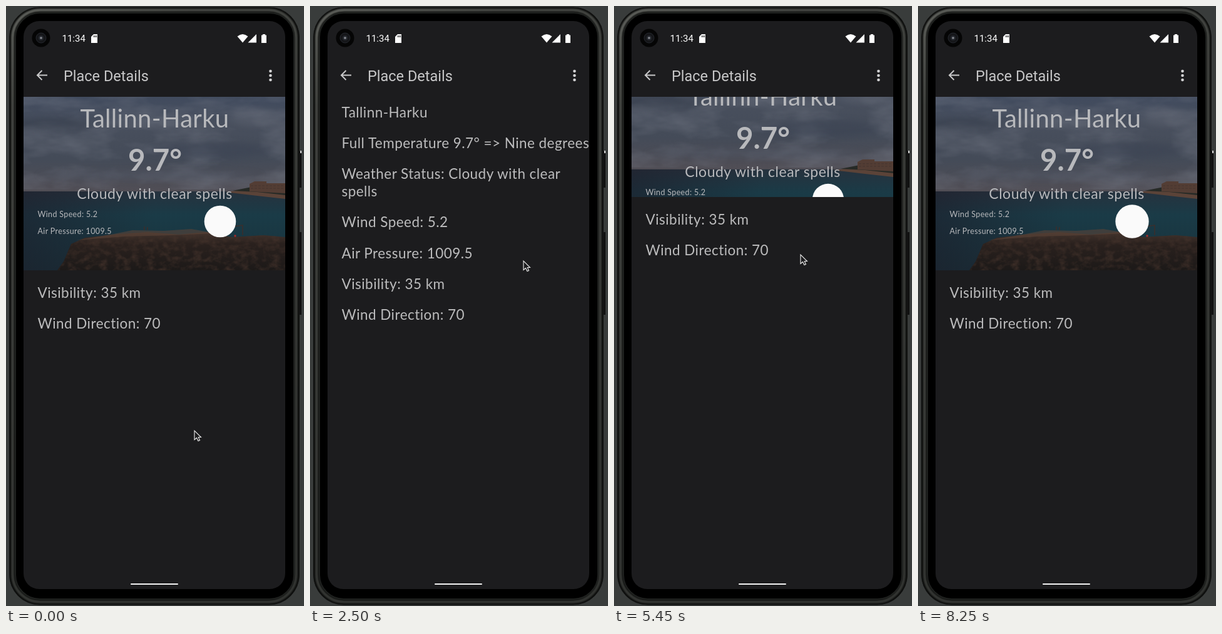
These frames come from a looping animation (476x958 px, 8300 ms). An HTML page:

```html
<!DOCTYPE html>
<html lang="en">
<head>
<meta charset="utf-8">
<title>Place Details</title>
<style>
  html, body { margin: 0; width: 100%; height: 100%; overflow: hidden; background: #393c3b; }
  svg { display: block; width: 476px; height: 958px; }
  filter { color-interpolation-filters: sRGB; }
  .ui { font-family: Roboto, sans-serif; }
  .body { font: 22.5px Lato, sans-serif; letter-spacing: .45px; fill: #bcbcbd; }
  .head { font-family: Lato, sans-serif; fill: #b8b9bc; }
</style>
</head>
<body>
<svg viewBox="0 0 476 958">
  <defs>
    <linearGradient id="rim" x2=".25" y2="1">
      <stop offset="0" stop-color="#62645f"/><stop offset=".15" stop-color="#464844"/>
      <stop offset="1" stop-color="#343633"/>
    </linearGradient>
    <linearGradient id="sky" x2="0" y2="1">
      <stop offset="0" stop-color="#414b5e"/><stop offset=".3" stop-color="#484f5d"/>
      <stop offset=".65" stop-color="#444b58"/><stop offset="1" stop-color="#514e55"/>
    </linearGradient>
    <linearGradient id="sea" x2="0" y2="1">
      <stop offset="0" stop-color="#26323e"/><stop offset=".3" stop-color="#1a3b47"/>
      <stop offset="1" stop-color="#18313a"/>
    </linearGradient>
    <linearGradient id="rock" x2="0" y2="1">
      <stop offset="0" stop-color="#43342d"/><stop offset=".3" stop-color="#2a211e"/>
      <stop offset="1" stop-color="#1c1918"/>
    </linearGradient>
    <linearGradient id="shade">
      <stop offset="0" stop-color="#1d1c28" stop-opacity=".55"/>
      <stop offset=".5" stop-color="#1d1c28" stop-opacity="0"/>
    </linearGradient>
    <filter id="clouds" x="0" y="0" width="1" height="1">
      <feTurbulence type="fractalNoise" baseFrequency=".012 .03" numOctaves="4" seed="8"/>
      <feColorMatrix values="0 0 0 0 .46  0 0 0 0 .48  0 0 0 0 .53  2 0 0 0 -.75"/>
    </filter>
    <filter id="grit" x="0" y="0" width="1" height="1">
      <feTurbulence type="fractalNoise" baseFrequency=".08 .11" numOctaves="3" seed="4"/>
      <feColorMatrix values="0 0 0 0 .27  0 0 0 0 .2  0 0 0 0 .17  1.6 0 0 0 -.65" result="n"/>
      <feComposite in="n" in2="SourceGraphic" operator="in" result="spots"/>
      <feMerge><feMergeNode in="SourceGraphic"/><feMergeNode in="spots"/></feMerge>
    </filter>
    <filter id="soft"><feGaussianBlur stdDeviation="9 5"/></filter>
    <filter id="bevel"><feGaussianBlur stdDeviation="1.2"/></filter>
    <clipPath id="headerClip"><rect id="headerBox" x="28" y="145" width="418" height="277"/></clipPath>
    <clipPath id="listClip"><rect x="28" y="145" width="418" height="770"/></clipPath>
  </defs>

  <!-- phone -->
  <rect width="476" height="958" fill="#393c3b"/>
  <path d="M469 232h3v58h-3zM469 361h3v132h-3z" fill="#111"/>
  <rect x="470" y="231" width="2" height="4" fill="#ddd"/>
  <rect x="5.5" y="2" width="463" height="954" rx="48" fill="#0a0b0a" stroke="#151615"/>
  <rect x="10.500" y="6.500" width="453" height="945" rx="44" fill="none" stroke="url(#rim)" stroke-width="4.500" filter="url(#bevel)"/>
  <rect x="15" y="11" width="445" height="936" rx="39" fill="#000" stroke="#1f211f" stroke-width="2"/>
  <rect x="28" y="24" width="418" height="907" rx="25" fill="#1c1c1e"/>

  <!-- status and tool bars -->
  <circle cx="56" cy="51" r="14.5" fill="#050505"/>
  <circle cx="56" cy="51" r="8" fill="#151619" stroke="#24272d"/>
  <circle cx="56" cy="51" r="4" fill="#25282e"/>
  <circle cx="56" cy="51" r="1.8" fill="#8b8e94"/>
  <g fill="#fff" class="ui">
    <text x="89.5" y="57" font-size="15">11:34</text>
    <path d="M140 45h6v14h-10v-10z"/>
    <path d="M140.500 47v3M142.500 47v3M144.500 47v3" stroke="#1c1c1e"/>
    <path d="M369.500 48.500q8.500-7 17 0l-8.500 10z"/>
    <path d="M400 45v13.500h-13.500z"/>
    <path d="M410 46.500v-1.500h4v1.500h2v12.500h-8v-12.500z"/>
  </g>
  <path d="M66 110.500H50M57.500 103l-7.500 7.500 7.500 7.500" fill="none" stroke="#c9c9ca" stroke-width="2"/>
  <text x="92" y="120" class="ui" font-size="23.5" fill="#c7c7c8">Place Details</text>
  <g fill="#d2d2d3">
    <circle cx="422.500" cy="104" r="2.300"/><circle cx="422.500" cy="111" r="2.300"/><circle cx="422.500" cy="118" r="2.300"/>
  </g>

  <!-- collapsing header -->
  <g clip-path="url(#headerClip)">
    <g id="header">
      <rect x="28" y="145" width="418" height="153" fill="url(#sky)"/>
      <rect x="28" y="145" width="418" height="148" filter="url(#clouds)" opacity=".5"/>
      <g filter="url(#soft)">
        <ellipse cx="75" cy="188" rx="65" ry="10" fill="#333b49" opacity=".5"/>
        <ellipse cx="330" cy="230" rx="95" ry="13" fill="#3b4353" opacity=".5"/>
        <ellipse cx="230" cy="270" rx="170" ry="7" fill="#515765" opacity=".5"/>
        <ellipse cx="400" cy="178" rx="45" ry="14" fill="#626774" opacity=".4"/>
      </g>
      <rect x="28" y="296" width="418" height="126" fill="url(#sea)"/>
      <rect x="28" y="296" width="418" height="126" fill="url(#shade)"/>
      <path d="M350 297l40-4 56 7v8l-45-5z" fill="#5b4338"/>
      <path d="M362 295l30-6 54 9v4l-45-5z" fill="#262a26"/>
      <path d="M389 284l8-4h19v3h30v16l-57-3z" fill="#533d34"/>
      <path d="M391 287h53M391 291h53" stroke="#44342f" stroke-dasharray="4 2"/>
      <g filter="url(#grit)">
        <path d="M82 422l10-14 12-28 22-10 55-6 45-3 50 4 42-4 42 8 52-3 34 3v53z" fill="url(#rock)"/>
      </g>
      <path d="M112 374l60-10 30-6 50 1 44-3 40 7-70 3-76 2z" fill="#5a4438" opacity=".6"/>
      <path d="M221 358v-6M226 358v-5M378 366v-16l-28 4" fill="none" stroke="#3c2e2b" stroke-width="1.500"/>
      <circle cx="366" cy="367" r="1.700" fill="#a52b29"/>
      <g class="head">
        <g text-anchor="middle">
          <text x="237.500" y="194" font-size="40" letter-spacing=".3">Tallinn-Harku</text>
          <text x="238" y="263" font-size="47.5" font-weight="700">9.7°</text>
          <text x="237.500" y="308" font-size="23" letter-spacing=".5">Cloudy with clear spells</text>
        </g>
        <g font-size="12.500" letter-spacing=".35">
          <text x="50.500" y="337">Wind Speed: 5.2</text>
          <text x="50.500" y="364">Air Pressure: 1009.5</text>
        </g>
      </g>
      <circle id="sun" cx="342" cy="344" r="26" fill="#fafafa"/>
      <g id="sparks" fill="#b51f2b">
        <circle cx="314" cy="321" r="1.600"/><circle cx="370" cy="327" r="1.400"/>
      </g>
    </g>
  </g>

  <!-- details, laid out from the header's lower edge -->
  <g clip-path="url(#listClip)">
    <g id="list" class="body">
      <g id="summary">
        <text x="50.500" y="33">Tallinn-Harku</text>
        <text x="50.500" y="82">Full Temperature 9.7° =&gt; Nine degrees</text>
        <text x="50.500" y="131">Weather Status: Cloudy with clear</text>
        <text x="50.500" y="159">spells</text>
        <text x="50.500" y="208">Wind Speed: 5.2</text>
        <text x="50.500" y="258">Air Pressure: 1009.5</text>
      </g>
      <g id="common">
        <text x="50.500" y="44">Visibility: 35 km</text>
        <text x="50.500" y="93">Wind Direction: 70</text>
      </g>
    </g>
  </g>
  <rect x="199" y="922" width="76" height="2" rx="1" fill="#f4f4f4"/>
  <path id="cursor" d="M0 0V14.500L3.500 11.500 6 16.500 8.500 15.500 6.300 10.500H10.500Z" fill="#1c1c1e" stroke="#eee" stroke-width="1.100"/>
</svg>
<script>
const DURATION = 8300, STEP = 50;
const HEADER_HEIGHT = 277, HEADER_BOTTOM = 422, PARALLAX = 0.3;
const PULSE = 1100;

// [time, pixels collapsed]
const collapseKeys = [
  [150, 0], [450, 76], [750, 148], [850, 155], [1050, 155], [1300, 235], [1600, 277],
  [2500, 277], [3050, 128], [3300, 111], [3600, 45], [3950, 0],
  [5150, 0], [5450, 117], [5700, 277], [6150, 277], [6450, 185], [6750, 94], [7050, 40], [7400, 0]
];
// [time, x, y] of the pointer's tip
const cursorKeys = [
  [0, 301, 678], [100, 302, 688], [750, 322, 534], [1050, 322, 534], [1700, 323, 500],
  [1950, 323, 500], [2300, 340, 402], [2500, 341, 407], [3050, 344, 560], [3300, 345, 577],
  [4050, 350, 558], [4200, 350, 558], [4600, 460, 264], [5000, 304, 558], [5100, 300, 574],
  [5450, 298, 397], [5700, 296, 340], [6150, 295, 360], [6750, 294, 539], [7400, 296, 640]
];

const el = id => document.getElementById(id);
const show = (id, visible) => el(id).setAttribute("visibility", visible ? "visible" : "hidden");
const move = (id, x, y) => el(id).setAttribute("transform", `translate(${x} ${y})`);
const within = (t, from, to) => t >= from && t < to;

function sample(keys, t, column = 1) {
  const next = keys.findIndex(key => key[0] > t);
  if (next === 0) return keys[0][column];
  if (next < 0) return keys[keys.length - 1][column];
  const a = keys[next - 1], b = keys[next];
  return a[column] + (b[column] - a[column]) * (t - a[0]) / (b[0] - a[0]);
}

function draw(t) {
  const collapse = sample(collapseKeys, t);
  const expandedList = within(t, 1600, 4000) || within(t, 5700, 7450);
  const phase = t % PULSE / PULSE;

  el("headerBox").setAttribute("height", HEADER_HEIGHT - collapse);
  move("header", 0, -collapse * PARALLAX);
  move("list", 0, HEADER_BOTTOM - collapse);
  show("summary", expandedList);
  move("common", 0, expandedList ? 263 : 0);

  el("sun").setAttribute("r", 26 - Math.cos(2 * Math.PI * (phase - 0.87)));
  show("sparks", within(phase, 0.65, 0.85));

  show("cursor", t < 7550);
  move("cursor", sample(cursorKeys, t), sample(cursorKeys, t, 2));
}

let lastStep = -1;
function tick() {
  const step = Math.floor(performance.now() % DURATION / STEP);
  if (step !== lastStep) draw(step * STEP);
  lastStep = step;
  requestAnimationFrame(tick);
}
tick();
</script>
</body>
</html>
```
